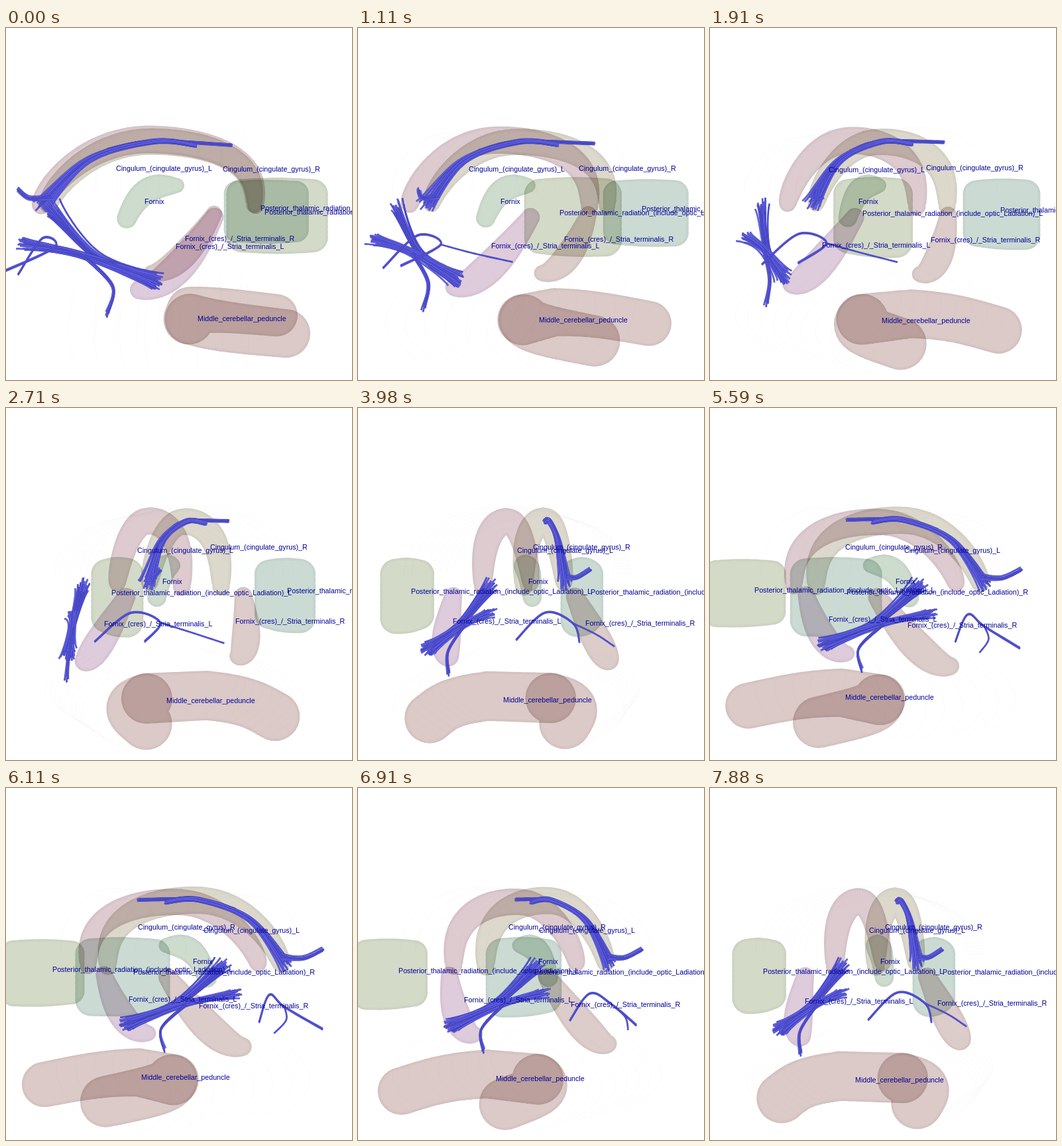
Write an HTML page with a canvas that moves like this. It is 522x532 px and loops after 8000 ms.

```html
<!DOCTYPE html>
<html lang="en">
<head>
<meta charset="utf-8">
<title>Rotating white matter tracts</title>
<style>
  html, body { margin: 0; width: 100%; height: 100%; overflow: hidden; background: #fff; }
  #stage { position: relative; width: 100%; height: 100%; overflow: hidden; contain: strict; }
  canvas { position: absolute; left: 0; top: 0; }
  span {
    position: absolute; left: 0; top: 0; white-space: nowrap; color: #000096;
    font: 10.7px/12px "Liberation Sans", Arial, sans-serif;
  }
</style>
</head>
<body>
<div id="stage"><canvas width="522" height="532"></canvas></div>
<script>
const W = 522, H = 532, LOOP = 8000, TURN = 5930, STEP = 160;
const { PI, sqrt } = Math;
const stage = document.getElementById('stage');
const ctx = stage.firstChild.getContext('2d');
const layer = new OffscreenCanvas(W, H);
const ink = layer.getContext('2d');

let seed = 11;
const random = () => (seed = seed * 16807 % 2147483647) / 2147483647;
const jitter = () => random() + random() - 1;
const sample = (n, f) => Array.from({ length: n + 1 }, (_, i) => f(i / n));

// Points are [posterior, right, down, radius].
let cos = 1, sin = 0;
function project([b, r, y, radius = 0]) {
  const depth = b * sin - r * cos;
  const k = 1 / (1 - depth / 1375);
  return [249 + (b * cos + r * sin) * k, 266 + (y + 0.0147 * depth) * k, radius * k];
}

const cingulum = side => sample(110, u => {
  const height = Math.sin(PI * u);
  return [-33 - 159 * Math.cos(PI * u), side * 29,
    2 - 98 * height ** (u < 0.5 ? 1.5 : 0.7), 12 + 8.5 * sqrt(height)];
});
const crus = side => sample(50, u =>
  [-38 + 103 * u, side * (126 - 36 * u * u), 116 - 99 * u ** 1.8, 13 + 9 * Math.sin(PI * u)]);
const radiation = (side, r) => sample(8, v => sample(16, u =>
  [102 + 96 * u, side * r, -15 + 58 * v, 21 + 2 * Math.sin(PI * u)])).flat();
const fornix = sample(40, u =>
  [-67 + 76 * u, 0, -28 + 50 * (1 - u) ** 3.5, 15 + 6 * Math.sin(PI * u) - 4 * u]);
const arm = side => sample(50, u =>
  [30 + 135 * u, side * (93 - 45 * (1 - u) ** 4), 167 + 13 * u, 37 - 3 * u]);
const bridge = sample(30, u => [28, 96 * u - 48, 167, 37]);

const armL = arm(-1), armR = arm(1);
const peduncleColor = [219, 202, 200];
const solids = [
  [cingulum(-1), [221, 203, 208]], [cingulum(1), [220, 216, 204]],
  [crus(-1), [222, 203, 219]], [crus(1), [220, 204, 202]],
  [radiation(-1, 129), [212, 218, 200]], [radiation(1, 114), [203, 219, 211]],
  [fornix, [206, 220, 206]]
];

// Smooth curve through a few points.
function spline(points, u) {
  const x = u * (points.length - 1);
  const i = Math.min(Math.floor(x), points.length - 2);
  const f = x - i;
  const [p, q, s, t] = [points[i - 1] || points[i], points[i], points[i + 1], points[i + 2] || points[i + 1]];
  return q.map((v, n) => v + f / 2 * (s[n] - p[n] +
    f * (2 * p[n] - 5 * v + 4 * s[n] - t[n] + f * (3 * (v - s[n]) + t[n] - p[n]))));
}

// Strands share a centre line and fan out from the waist towards head and tail.
function bundle(count, [waist, head, tail], points) {
  return Array.from({ length: count }, () => {
    const shift = [jitter(), jitter(), jitter()];
    const line = sample(30, u => {
      const spread = waist + (u < 0.5 ? head : tail) * (2 * u - 1) ** 2;
      return spline(points, u).map((v, n) => v + shift[n] * spread);
    });
    return { line, shade: random() };
  });
}
const hub = [-13, -155, 102], fork = [-185, 45, 69];
const fibres = [
  ...bundle(5, [5, 0, 0], [[92, 58, -92], [-30, 35, -97], [-100, 32, -84]]),
  ...bundle(24, [5, 0, 13], [[36, 42, -92], [-30, 35, -97], [-130, 31, -69], [-202, 32, 0]]),
  ...bundle(6, [5, 4, 0], [[-190, 35, -9], [-225, 46, -8], [-248, 66, -22]]),
  ...bundle(26, [6, 8, 10], [hub, [-96, -130, 70], [-165, -95, 4]]),
  ...bundle(20, [6, 8, 7], [hub, [-120, -124, 68], [-205, -104, 54]]),
  ...bundle(4, [3, 0, 3], [[-115, -125, 70], [-74, -141, 110], [-82, -143, 148]]),
  ...bundle(2, [1.5, 0, 1], [[-220, -62, 102], [-195, -5, 52], fork, [-268, 43, 108]]),
  ...bundle(1, [0, 0, 0], [[-95, 127, 100], [-150, 90, 85], fork])
];

// Barely visible dotted contours around the tracts.
const contours = sample(7, k => [-1, 1].flatMap(side => [
  sample(20, u => [-130 + 240 * k, side * 150 * Math.cos(PI / 2 * u), -15 - 95 * Math.sin(PI / 2 * u)]),
  sample(20, u => [-130 + 240 * k, side * (100 + 65 * Math.sin(PI * u)), 110 + 116 * u])
])).flat();

const labels = [
  ['Cingulum_(cingulate_gyrus)_R', 78, 32, -54],
  ['Cingulum_(cingulate_gyrus)_L', -80, -28, -53],
  ['Fornix', -40, 0, -4],
  ['Posterior_thalamic_radiation_(include_optic_Ladiation)_R', 141, 123, 8],
  ['Posterior_thalamic_radiation_(include_optic_Ladiation)_L', 133, -131, 9],
  ['Fornix_(cres)_/_Stria_terminalis_R', 18, 98, 57],
  ['Fornix_(cres)_/_Stria_terminalis_L', 11, -107, 57],
  ['Middle_cerebellar_peduncle', 40, -21, 170]
].map(([text, ...point]) => {
  const node = document.createElement('span');
  node.textContent = text;
  stage.append(node);
  return { node, point };
});

function trace(line, width, color) {
  ctx.lineWidth = width;
  ctx.strokeStyle = color;
  ctx.beginPath();
  line.forEach(p => ctx.lineTo(...project(p)));
  ctx.stroke();
}

function drawSolid(points, color) {
  const discs = points.map(project);
  ink.clearRect(0, 0, W, H);
  [[0, 0.95], [1.5, 0.975], [4, 1]].forEach(([inset, light]) => {
    ink.fillStyle = `rgb(${color.map(v => v * light).join(',')})`;
    ink.beginPath();
    for (const [x, y, size] of discs) {
      const radius = size - inset;
      ink.moveTo(x + radius, y);
      ink.arc(x, y, radius, 0, 2 * PI);
    }
    ink.fill();
  });
  ctx.drawImage(layer, 0, 0);
}

function draw(index) {
  const angle = (2.5 + 4 * index) * PI / 180;
  cos = Math.cos(angle);
  sin = Math.sin(angle);

  ctx.globalCompositeOperation = 'source-over';
  ctx.fillStyle = '#fff';
  ctx.fillRect(0, 0, W, H);
  ctx.setLineDash([1, 3]);
  contours.forEach(line => trace(line, 1, '#f1f1f1'));
  ctx.setLineDash([]);

  ctx.globalCompositeOperation = 'multiply';
  solids.forEach(([points, color]) => drawSolid(points, color));
  // The bridge joins the far arm, so only the near arm overlaps it.
  const [near, far] = cos > 0 ? [armL, armR] : [armR, armL];
  drawSolid([...bridge, ...far], peduncleColor);
  drawSolid(near, peduncleColor);

  ctx.globalCompositeOperation = 'source-over';
  ctx.globalAlpha = 0.88;
  for (const { line, shade } of fibres) {
    trace(line, 2.7, '#3c3cac');
    trace(line, 1.7, `rgb(${78 + shade * 30},${78 + shade * 30},${212 + shade * 35})`);
  }
  ctx.globalAlpha = 1;

  for (const { node, point } of labels) {
    const [x, y] = project(point);
    node.style.transform = `translate(${Math.round(x)}px, ${Math.round(y - 6)}px)`;
  }
}

// The view swings forward in steps, then back through the same poses.
let shown = -1;
function tick() {
  const t = performance.now() % LOOP;
  const index = t < TURN ? Math.floor((t + 22) / STEP) : Math.ceil((2 * TURN - t + 5) / STEP);
  if (index !== shown) draw(shown = index);
  requestAnimationFrame(tick);
}
tick();
</script>
</body>
</html>
```
